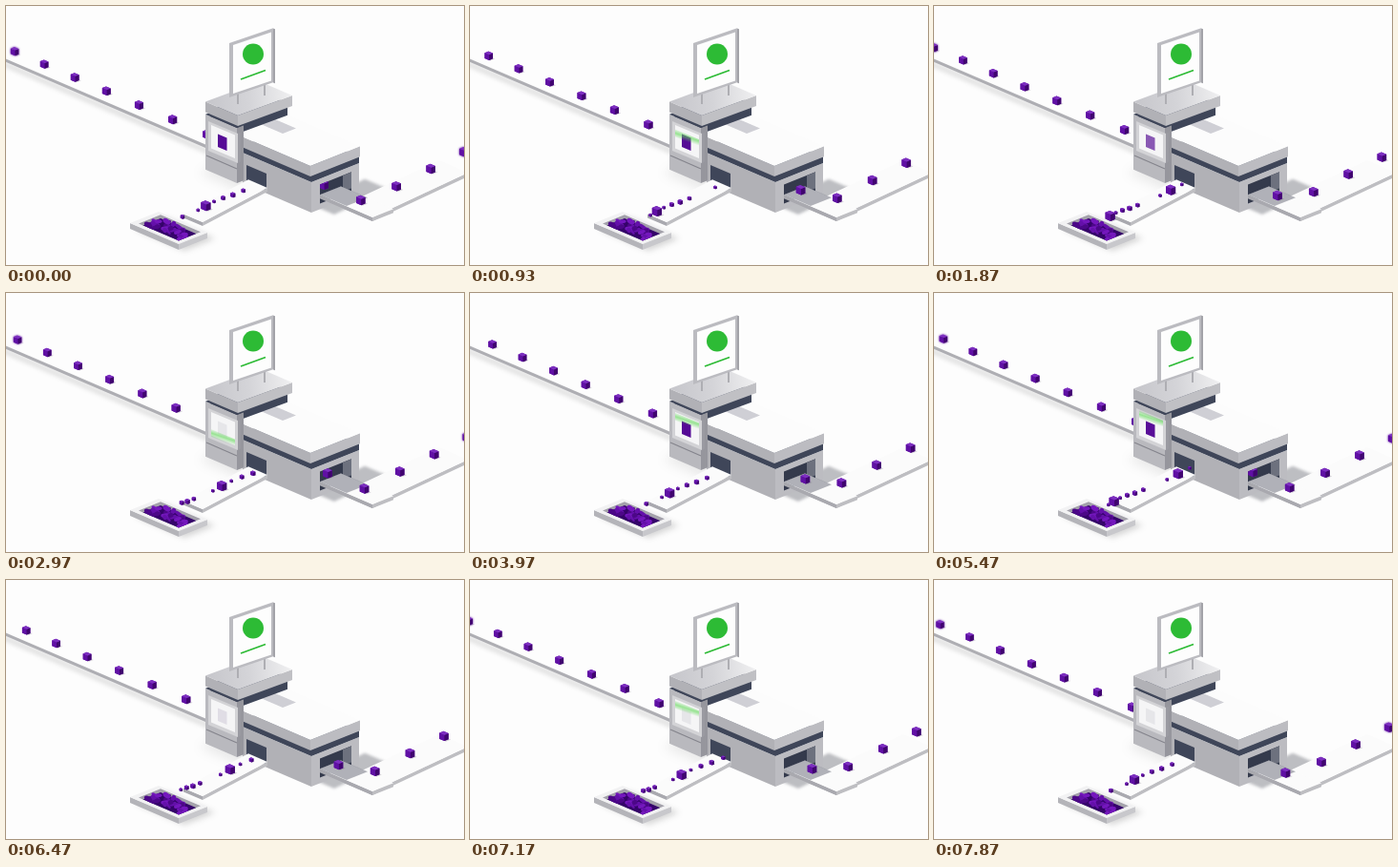
Animation of 480 by 272 pixels, one loop 7910 ms. Source, as an HTML page with a canvas:

```html
<!DOCTYPE html>
<html lang="en">
<head>
<meta charset="utf-8">
<title>Sorting machine</title>
<style>
html, body { margin: 0; width: 100%; height: 100%; overflow: hidden; background: #fdfdfd }
canvas { display: block; width: 480px; height: 272px }
</style>
</head>
<body>
<canvas id="stage" width="480" height="272"></canvas>
<script>
const W = 480, H = 272, LOOP = 7.91, CYCLE = LOOP / 2, SCAN = LOOP / 5;
const PURPLE = '#560b96', GREEN = '#2dbb35', NAVY = '#3f4659';
const STONE = ['#fcfcfc', '#b1b1b6', '#bcbcc1'];
const VIOLET = ['#7d2fc0', '#6010a4', '#40056f'];
const LEFT = .43, RIGHT = .4; // screen slopes of the two ground axes
const stage = document.getElementById('stage').getContext('2d');
const clamp = v => Math.max(0, Math.min(1, v));

function trace(c, ...pts) {
  c.beginPath();
  for (const [x, y] of pts) c.lineTo(x, y);
  c.closePath();
}

// upright wall: top-left corner, width, height, slope of its top edge
function face(c, fill, x, y, w, h, slope) {
  trace(c, [x, y], [x + w, y + w * slope], [x + w, y + w * slope + h], [x, y + h]);
  c.fillStyle = fill;
  c.fill();
}

// level surface: front corner, extents to the back left and back right
function plane(c, fill, x, y, l, r, blur = 0, sr = RIGHT) {
  const dl = l * LEFT, dr = r * sr;
  c.filter = blur ? `blur(${blur}px)` : 'none';
  trace(c, [x, y], [x + r, y - dr], [x + r - l, y - dr - dl], [x - l, y - dl]);
  c.fillStyle = fill;
  c.fill();
  c.filter = 'none';
}

function block(c, [top, left, right], x, y, l, r, h, sr = RIGHT) {
  face(c, left, x - l, y - l * LEFT, l, h, LEFT);
  face(c, right, x, y, r, h, -sr);
  plane(c, top, x, y, l, r, 0, sr);
}

function line(c, color, width, x1, y1, x2, y2) {
  c.strokeStyle = color;
  c.lineWidth = width;
  c.beginPath();
  c.moveTo(x1, y1);
  c.lineTo(x2, y2);
  c.stroke();
}

function ramp(c, x1, y1, x2, y2, ...colors) {
  const g = c.createLinearGradient(x1, y1, x2, y2);
  colors.forEach((k, i) => g.addColorStop(i / (colors.length - 1), k));
  return g;
}

function layer(paint) {
  const cv = document.createElement('canvas');
  cv.width = W;
  cv.height = H;
  paint(cv.getContext('2d'));
  return cv;
}

function cube(x, y, s, blur = 0) {
  const c = stage;
  plane(c, 'rgba(60,50,75,.2)', x + s * .2, y + s * .52, s * .5, s * .5);
  if (blur > .1) c.filter = `blur(${blur}px)`;
  const [top, left, right] = VIOLET, fx = x + s * .05, fy = y - s * .15;
  // silhouette first, so that blurred seams stay purple
  trace(c, [fx, fy + s * .62], [fx + s * .42, y + s * .3], [fx + s * .42, y - s * .32],
    [fx - s * .08, y - s * .53], [fx - s * .5, y - s * .36], [fx - s * .5, y + s * .25]);
  c.fillStyle = left;
  c.fill();
  c.filter = 'none';
  block(c, [top, left, right], fx, fy, s * .5, s * .42, s * .62);
}

function drawTray(c) {
  plane(c, 'rgba(0,0,0,.16)', 187, 257, 51, 32, 3);
  block(c, ['#f2f2f3', '#b4b4b9', '#c8c8cc'], 181, 250, 51, 30, 6);
  plane(c, '#a3a1aa', 181, 246.5, 42, 23);
  c.save();
  c.clip();
  plane(c, '#35036a', 181, 247, 38, 19);
  let seed = 11;
  const rnd = () => (seed = seed * 16807 % 2147483647) / 2147483647;
  for (let i = 0; i < 34; i++) {
    const l = rnd() * 36, r = rnd() * 17;
    c.fillStyle = ['#7417bd', '#6410aa', '#4c0788'][i % 3];
    c.beginPath();
    c.ellipse(181 - l + r, 245 - l * LEFT - r * RIGHT, 2.5 + rnd() * 2.5, 1.4 + rnd() * 1.2, rnd() * 2 - 1, 0, 7);
    c.fill();
  }
  c.restore();
}

function drawSign(c) {
  line(c, '#aeaeb3', 2, 243, 90, 243, 103);
  line(c, '#aeaeb3', 2, 271, 82, 271, 94);
  face(c, '#a2a2a8', 280, 23.4, 2, 57, .4);
  face(c, '#bbbbc0', 234, 39, 46, 57, -.34);
  face(c, '#fdfdfd', 238, 41, 40, 51, -.34);
  line(c, GREEN, 1.8, 246, 77, 272, 67.5);
  c.fillStyle = GREEN;
  c.beginPath();
  c.arc(259, 50.5, 11, 0, 7);
  c.fill();
}

const ground = layer(c => {
  c.fillStyle = '#fdfdfd';
  c.fillRect(0, 0, W, H);
  c.filter = 'blur(2px)';
  line(c, 'rgba(0,0,0,.1)', 6, -4, 60, 212, 153);
  c.filter = 'blur(.5px)';
  line(c, '#aeaeb3', 3, -4, 55.5, 212, 148.5);
  c.filter = 'none';
  plane(c, 'rgba(0,0,0,.08)', 250, 196, 48, 30, 6);
  plane(c, 'rgba(70,72,85,.35)', 344, 219, 24, 56, 1.5, .48);
});

const building = layer(c => {
  // body with both openings
  block(c, STONE, 320, 185, 72, 50, 32);
  face(c, NAVY, 252, 167, 21, 18, LEFT);
  face(c, '#343a4c', 329, 187.5, 33, 20, -RIGHT);
  face(c, '#6d717e', 353, 178, 9, 17, -RIGHT);

  // outgoing and scrap belts
  const belt = ['#fbfbfb', '#a9a9af', '#bebec2'];
  block(c, belt, 384, 222, 30, 100, 4, .47);
  block(c, belt, 384, 222, 55, 22, 4);
  plane(c, 'rgba(85,88,102,.45)', 357, 210, 28, 22);
  block(c, belt, 206, 227, 20, 68, 4, .53);
  drawTray(c);

  // main roof over a dark recess
  block(c, [NAVY, NAVY, NAVY], 320, 178, 72, 50, 7);
  block(c, STONE, 319, 168, 76, 52, 11);
  plane(c, '#cfcfd5', 290, 134, 40, 14);

  // tower, recess and upper roof
  block(c, [NAVY, NAVY, NAVY], 243, 121, 29, 52, 13, .37);
  block(c, [NAVY, '#b9b9be', '#96969d'], 242, 128, 33, 7, 58);
  line(c, '#85858d', 1.3, 210, 157, 242, 171);
  const lit = ramp(c, 209, 101, 300, 94, '#c6c6cb', '#d4d4d8', '#f0f0f1');
  block(c, [lit, '#b1b1b6', '#c0c0c4'], 243, 115, 34, 57, 11, .37);

  // screen
  face(c, '#9a9aa1', 243, 134, 3, 31, -RIGHT);
  face(c, '#d3d3d6', 212, 121, 31, 31, .42);
  face(c, '#f5f5f6', 215, 125, 25, 24.5, .42);
  drawSign(c);
});

function drawScreen(t) {
  const c = stage, sweep = (t % SCAN - .68) / .74;
  const square = fill => face(c, fill, 222, 134.5, 9.5, 13.5, .42);
  square('#e6e6e9');
  c.globalAlpha = clamp(1 - (t % CYCLE - 1.5) * .95);
  square(PURPLE);
  c.globalAlpha = 1;
  if (sweep < 0 || sweep > 1) return;
  const y = 125 + sweep * 22;
  const glow = ramp(c, 227, y, 224, y + 9, 'rgba(90,215,80,0)', 'rgba(90,215,80,.6)', 'rgba(90,215,80,0)');
  face(c, glow, 215, y - 3, 25, 8, .42);
}

// each batch: one big lump among small crumbs
function drawScraps(t) {
  for (let n = -2; n < 2; n++) for (let i = -1; i < 5; i++) {
    const age = t - .9 - n * CYCLE - i * .53;
    if (age < 0 || age > 5.4) continue;
    const d = 24 * age - 1.35 * age * age;
    const size = i ? 3 + 2.6 * Math.sin(i * .55) ** 2 : 11;
    if (d > 2 && d < 89) cube(270 - d, 184 + d * .43 + Math.sin(i * 5), size);
  }
}

function drawIncoming(phase) {
  for (let i = -1; i < 7; i++) {
    const u = i + phase, x = 9 + 30.5 * u + .52 * u * u;
    if (x < 216) cube(x, 48 + (x - 9) * .432, 9.2 + x * .004, clamp(1 - x / 125) * .9);
  }
}

function drawOutgoing(phase) {
  stage.save();
  trace(stage, [329, 187.5], [362, 174], [362, 130], [W, 130], [W, H], [329, H]);
  stage.clip();
  for (let i = 4; i >= 0; i--) {
    const u = i + phase, x = 333 + 39.3 * u - .65 * u * u;
    const y = x < 377 ? 188 + (x - 333) * .42 : 206 - (x - 377) * .51;
    cube(x, y, 10.4, clamp((x - 400) / 80) * .9);
  }
  stage.restore();
}

function frame(now) {
  const t = now / 1000 % LOOP, phase = t * .37 % 1;
  stage.drawImage(ground, 0, 0);
  drawIncoming(phase);
  stage.drawImage(building, 0, 0);
  drawScreen(t);
  drawScraps(t);
  drawOutgoing(phase);
  requestAnimationFrame(frame);
}
requestAnimationFrame(frame);
</script>
</body>
</html>
```
